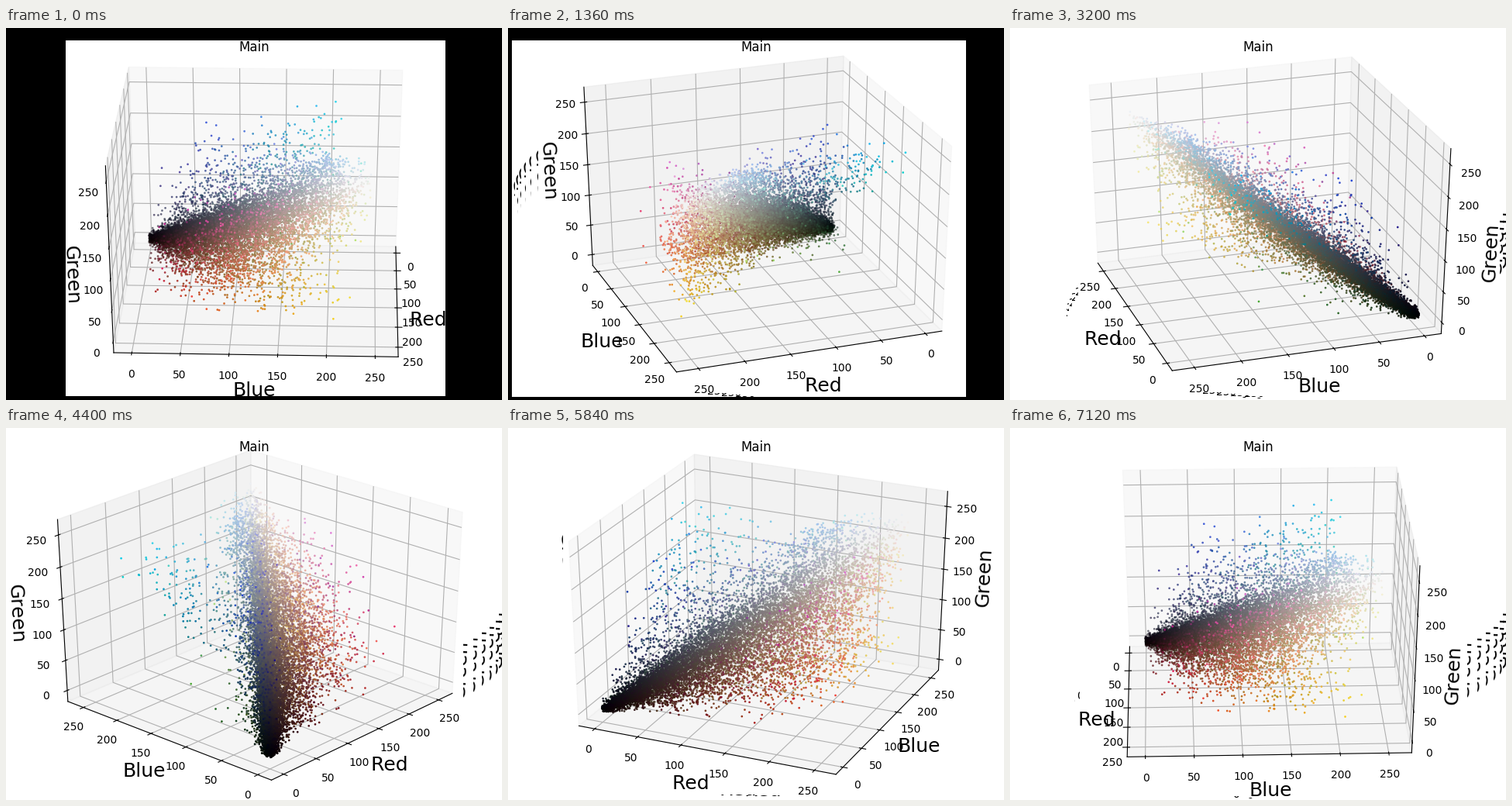
A matplotlib script that plays this animation: 640x480 px, repeating every 7200 ms.

```python
import numpy as np
import matplotlib.pyplot as plt
from matplotlib.animation import FuncAnimation
from matplotlib.collections import LineCollection
from matplotlib.colors import hsv_to_rgb
from matplotlib.patches import Polygon, Rectangle

plt.rcParams["text.kerning_factor"] = 6

W, H = 640, 480
FRAMES, INTERVAL = 90, 80
ELEV, DIST = np.radians(30), 10
LOW, SPAN = -12.75, 280.5           # axis range of every channel
HALF = 0.5 + 1 / 48                 # half the drawn cube
CELL = 1 / 12
TICK_PAD, LABEL_PAD = (k * 48 / 806.4 * CELL for k in (11.5, 25))
TICKS = np.arange(0, 251, 50)
NAMES = ("Red", "Blue", "Green")
HALF_WIDTHS = (22, 26, 7.5)         # ink size of the axis names
DROPS = (7, 7, 40)
WIPES = (0, 19, 64)                 # frames that start with a fresh stage
RIM = 4                             # part of the last frame left unpainted
NAME_STYLE = dict(fontsize=18, ha="center", va="center",
                  rotation_mode="anchor")
TICK_STYLE = dict(fontsize=10, ha="center", va="top")

# count, hue mean and spread, beta shapes of saturation and value
GROUPS = [
    (4300, 0.065, 0.035, 1.5, 4.0, 1.1, 1.6),
    (1700, 0.13, 0.05, 1.5, 5.5, 1.1, 1.5),
    (2600, 0.59, 0.06, 1.4, 8, 1.1, 1.6),
    (1700, 0.06, 0.03, 3.6, 2.8, 2.0, 1.8),
    (130, 0.12, 0.015, 5, 2, 6, 1.5),
    (300, 0.98, 0.025, 3.5, 2.5, 2, 2.4),
    (220, 0.93, 0.04, 2.5, 4, 5, 2),
    (460, 0.61, 0.035, 3.2, 2.8, 2.0, 2.4),
    (100, 0.535, 0.015, 5, 1.6, 8, 2.6),
    (260, 0.25, 0.08, 3, 3.5, 1.8, 6),
    (130, 0.58, 0.015, 12, 36, 25, 4),
]


def make_pixels():
    rng = np.random.default_rng(7)
    parts = []
    for n, hue, spread, s1, s2, v1, v2 in GROUPS:
        parts.append(np.column_stack([
            rng.normal(hue, spread, n) % 1,
            rng.beta(s1, s2, n),
            rng.beta(v1, v2, n) * 0.95,
        ]))
    rgb = hsv_to_rgb(np.vstack(parts))
    return np.clip(rgb + rng.normal(0.01, 0.015, rgb.shape), 0, 1)


def unit(value):
    return (value - LOW) / SPAN - 0.5


def azimuth(i):
    return np.radians(2 + 4 * i)


def project(points, az):
    """Stage position and depth of points given relative to the cube centre."""
    x, y, z = np.moveaxis(np.asarray(points, float), -1, 0)
    right = y * np.cos(az) - x * np.sin(az)
    near = x * np.cos(az) + y * np.sin(az)
    up = z * np.cos(ELEV) - near * np.sin(ELEV)
    depth = DIST - near * np.cos(ELEV) - z * np.sin(ELEV)
    px = W * (right / depth + 0.095) / 0.185
    py = H * (up / depth + 0.095) / 0.185
    return np.stack([px, py], axis=-1), depth


def far_corner(az):
    return np.array([-np.sign(np.cos(az)), -np.sign(np.sin(az)), -1]) * HALF


def outward(point, axis, pad):
    moved = point + np.sign(point) * pad
    moved[..., axis] = point[..., axis]
    return moved


def edge(axis, az):
    """Both ends of the cube edge that carries the axis."""
    start = far_corner(az)
    start[(1, 0, 0)[axis]] *= -1
    end = start.copy()
    end[axis] *= -1
    return np.array([start, end])


def tick_points(axis, az):
    points = np.tile(edge(axis, az)[0], (len(TICKS), 1))
    points[:, axis] = unit(TICKS)
    return points


def tick_places(axis, az):
    return project(outward(tick_points(axis, az), axis, TICK_PAD), az)[0]


def name_place(axis, az):
    ends = edge(axis, az)
    middle = ends.mean(axis=0)
    place = project(outward(middle, axis, LABEL_PAD), az)[0]
    angle = 0
    if axis == 2:
        (x0, y0), (x1, y1) = project(ends, az)[0]
        angle = np.degrees(np.arctan2(y1 - y0, x1 - x0)) % 180
        angle -= 180 * (angle > 90)
    return place, angle


def pane(axis, az):
    corner = far_corner(az)
    quad = np.tile(corner, (4, 1))
    b, c = (axis + 1) % 3, (axis + 2) % 3
    quad[:, b] *= [1, -1, -1, 1]
    quad[:, c] *= [1, 1, -1, -1]
    return project(quad, az)[0]


def tick_lines(axis, az):
    step = np.zeros(3)
    side = (1, 0, 0)[axis]
    step[side] = -np.sign(far_corner(az)[side]) * CELL
    points = tick_points(axis, az)
    ends = np.stack([points - 0.1 * step, points + 0.2 * step], axis=1)
    return project(ends, az)[0]


def grid_lines(axis, az):
    middle = np.tile(far_corner(az), (len(TICKS), 1))
    middle[:, axis] = unit(TICKS)
    first, last = middle.copy(), middle.copy()
    first[:, (axis + 1) % 3] *= -1
    last[:, (axis + 2) % 3] *= -1
    return project(np.stack([first, middle, last], axis=1), az)[0]


def labels(az):
    """Every axis text with its place, angle, style and ink box."""
    for k, name in enumerate(NAMES):
        (x, y), angle = name_place(k, az)
        w, drop = HALF_WIDTHS[k], DROPS[k]
        yield name, (x, y), angle, NAME_STYLE, (x - w, y - drop, x + w, y)
        for value, (x, y) in zip(TICKS, tick_places(k, az)):
            w = 4.4 * len(str(value)) - 0.5
            box = (x - w, y - 11, x + w, y)
            yield str(value), (x, y), 0, TICK_STYLE, box


def content_box(i):
    """Left, bottom, right and top of what one frame shows."""
    az = azimuth(i)
    boxes = [label[-1] for label in labels(az)]
    for k in range(3):
        quad = pane(k, az)
        boxes.append((*quad.min(axis=0), *quad.max(axis=0)))
    boxes = np.array(boxes)
    left, bottom = boxes[:, :2].min(axis=0)
    box = np.round([left, bottom, boxes[:, 2].max(), H - 16])
    return np.clip(box, 0, [W, H, W, H])


def painted_boxes():
    """Areas cleared by each frame: its content and most of the last one's."""
    boxes = np.array([content_box(i) for i in range(FRAMES)])
    last = boxes[:-1] + [RIM, RIM, -RIM, -RIM]
    painted = boxes.copy()
    painted[1:, :2] = np.minimum(boxes[1:, :2], last[:, :2])
    painted[1:, 2:] = np.maximum(boxes[1:, 2:], last[:, 2:])
    painted[list(WIPES[1:])] = [0, 0, W, H]
    return painted


pixels = make_pixels()
cloud = unit(pixels * 255)
painted = painted_boxes()


def sticks_out(box, j, i):
    """Whether a box of frame j lies partly outside all later areas."""
    later = painted[j + 1:i + 1]
    return (max(box[0], 0) < later[:, 0].min()
            or max(box[1], 0) < later[:, 1].min()
            or min(box[2], W) > later[:, 2].max())


fig = plt.figure(figsize=(W / 100, H / 100), dpi=100, facecolor="black")
ax = fig.add_axes([0, 0, 1, 1])
ax.set(xlim=(0, W), ylim=(0, H))
ax.axis("off")

papers, leftovers = [], []
for i, (x0, y0, x1, y1) in enumerate(painted):
    papers.append(ax.add_patch(Rectangle(
        (x0, y0), x1 - x0, y1 - y0, fc="white", lw=0, zorder=i)))
    if i + 1 == FRAMES:
        break
    for string, place, angle, style, box in labels(azimuth(i)):
        if sticks_out(box, i, i + 1):
            text = ax.text(*place, string, rotation=angle, zorder=i + 0.5,
                           **style)
            leftovers.append((i, box, text))

panes = [ax.add_patch(Polygon(np.zeros((4, 2)), fc=str(g), ec=str(g),
                              alpha=0.5, lw=1, zorder=100))
         for g in (0.95, 0.90, 0.925)]
grid = ax.add_collection(LineCollection([], colors="#b0b0b0", lw=0.8,
                                        zorder=101))
frame_lines = ax.add_collection(LineCollection(
    [], colors="black", lw=0.8, capstyle="projecting", zorder=102))
texts = [ax.text(*place, string, zorder=103, **style)
         for string, place, _, style, _ in labels(azimuth(0))]
dots = ax.scatter(*np.zeros((2, len(pixels))), s=4.2, marker="8", lw=0,
                  zorder=104)
ax.text(W / 2, 0.92 * H + 100 * 6 / 72, "Main", fontsize=12, ha="center",
        va="baseline", zorder=105)


def draw_leftovers(i):
    start = max(w for w in WIPES if w <= i)
    for j, paper in enumerate(papers):
        paper.set_visible(start <= j <= i)
    for j, box, text in leftovers:
        text.set_visible(start <= j < i and sticks_out(box, j, i))


def draw_dots(az):
    spots, depth = project(cloud, az)
    order = np.argsort(-depth)
    fade = 0.7 * (depth - depth.min()) / np.ptp(depth)
    dots.set_offsets(spots[order])
    dots.set_facecolors(np.column_stack([pixels, 1 - fade ** 2])[order])


def draw(i):
    az = azimuth(i)
    draw_leftovers(i)
    rules, black = [], []
    for k in range(3):
        panes[k].set_xy(pane(k, az))
        rules += list(grid_lines(k, az))
        black += [project(edge(k, az), az)[0], *tick_lines(k, az)]
    grid.set_segments(rules)
    frame_lines.set_segments(black)
    for text, (_, place, angle, _, _) in zip(texts, labels(az)):
        text.set_position(place)
        text.set_rotation(angle)
    draw_dots(az)


anim = FuncAnimation(fig, draw, frames=FRAMES, interval=INTERVAL,
                     init_func=lambda: draw(0), repeat=True, repeat_delay=0)
plt.show()
```
